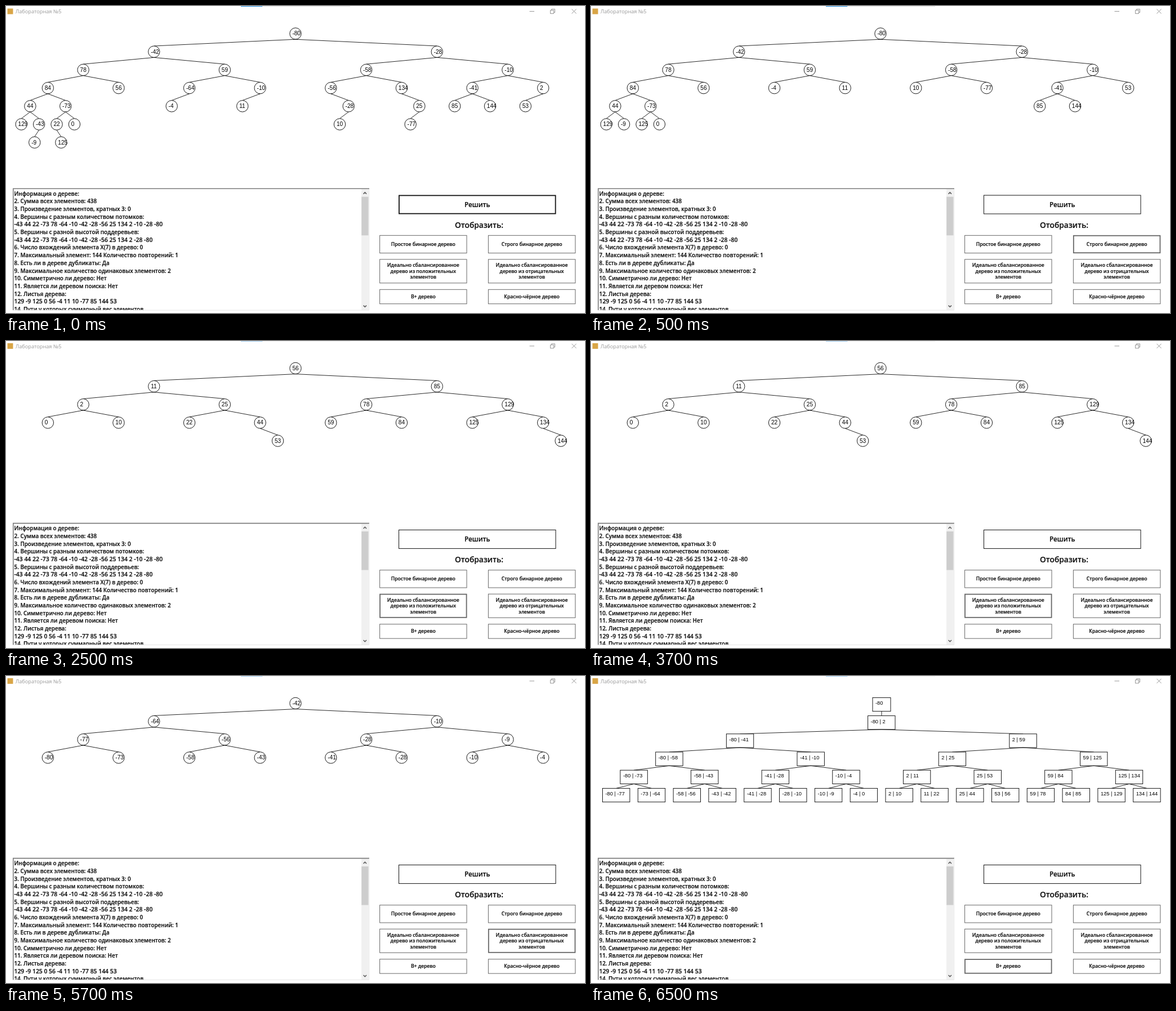
Write an HTML page that moves like this. It is 1028 px wide and 545 px high and loops after 8000 ms.

```html
<!DOCTYPE html>
<html lang="ru">
<head>
<meta charset="utf-8">
<style>
html, body { margin: 0; width: 100%; height: 100%; overflow: hidden; background: #fff; }
svg { display: block; }
text { font: 600 9.88px "Open Sans", "Noto Sans", sans-serif; fill: #111; stroke: #111; stroke-width: .2; white-space: pre; }
.node { font: 10.1px "Liberation Sans", Arial, sans-serif; fill: #000; stroke: none; }
.key { font: 9.3px "Liberation Sans", Arial, sans-serif; fill: #000; stroke: none; }
.title { font-weight: 400; fill: #999; stroke: none; }
.mid { text-anchor: middle; }
.line { fill: none; stroke: #000; stroke-width: .85; }
.shape { fill: #fff; stroke: #000; stroke-width: .9; }
</style>
</head>
<body>
<svg id="stage" width="1028" height="545" viewBox="0 0 1028 545"></svg>
<script>
const stage = document.getElementById('stage');
const LOOP = 8000, CUTS = [500, 2500, 4500, 6500];

const text = (x, y, s, size, name = '') =>
  `<text x="${x}" y="${y}" class="${name}" ${size ? `style="font-size:${size}px"` : ''}>${s}</text>`;
const rect = (x, y, w, h, extra) => `<rect x="${x}" y="${y}" width="${w}" height="${h}" ${extra}/>`;
const path = (d, extra = 'class="line"') => `<path d="${d}" ${extra}/>`;

// Trees are [value, left, right]
const simple = [-80,
  [-42,
    [78, [84, [44, [129], [-43, [-9]]], [-73, [22, null, [125]], [0]]], [56]],
    [59, [-64, [-4]], [-10, [11]]]],
  [-28,
    [-58, [-56, null, [-28, [10]]], [134, null, [25, [-77]]]],
    [-10, [-41, [85], [144]], [2, [53]]]]];

const values = ([v, l, r]) => [v, ...(l ? values(l) : []), ...(r ? values(r) : [])];
const sorted = values(simple).sort((a, b) => a - b);

// Replaces every node that has one child by that child
function strict([v, l, r]) {
  if (l && r) return [v, strict(l), strict(r)];
  return l || r ? strict(l || r) : [v];
}

function balanced(list) {
  if (!list.length) return null;
  const m = (list.length - 1) >> 1;
  return [list[m], balanced(list.slice(0, m)), balanced(list.slice(m + 1))];
}

const nodeX = (depth, i) => 11.5 + 1005 * (2 * i + 1) / 2 ** (depth + 1);
const nodeY = depth => 49 + 32.2 * depth;

function drawTree([v, ...kids], depth = 0, i = 0) {
  const x = nodeX(depth, i), y = nodeY(depth);
  let out = `<circle cx="${x}" cy="${y}" r="10.2" class="shape"/>` +
    text(x - 5.6, y + 3.4, v, 0, 'node');
  kids.forEach((kid, side) => {
    if (!kid) return;
    const j = 2 * i + side;
    out += path(`M${x} ${y + 10.2}L${nodeX(depth + 1, j)} ${nodeY(depth + 1) - 10.2}`) +
      drawTree(kid, depth + 1, j);
  });
  return out;
}

function drawPages() {
  const page = (x, y, w, s) => rect(x, y - 10, w, 24.3, 'class="shape"') +
    text(x + 5, y + 3, s, 0, 'key');
  let out = page(500, nodeY(0), 32, sorted[0]) + path(`M516 ${nodeY(0) + 14.3}V${nodeY(1) - 10}`);
  for (let d = 0; d < 5; d++) {
    const step = 32 >> d, y = nodeY(d + 1);
    for (let i = 0; i < 2 ** d; i++) {
      const x = nodeX(d, i);
      out += page(x - 22.4, y, 48.4, `${sorted[i * step]} | ${sorted[i * step + step / 2]}`);
      for (const j of d < 4 ? [2 * i, 2 * i + 1] : [])
        out += path(`M${x + 1.8} ${y + 14.3}L${nodeX(d + 1, j) + 1.8} ${y + 22.2}`);
    }
  }
  return out;
}

const report = [
  'Информация о дереве:',
  '2. Сумма всех элементов: 438',
  '3. Произведение элементов, кратных 3: 0',
  '4. Вершины с разным количеством потомков:',
  '-43 44 22 -73 78 -64 -10 -42 -28 -56 25 134 2 -10 -28 -80',
  '5. Вершины с разной высотой поддеревьев:',
  '-43 44 22 -73 78 -64 -10 -42 -28 -56 25 134 2 -28 -80',
  '6. Число вхождений элемента X(7) в дерево: 0',
  '7. Максимальный элемент: 144 Количество повторений: 1',
  '8. Есть ли в дереве дубликаты: Да',
  '9. Максимальное количество одинаковых элементов: 2',
  '10. Симметрично ли дерево: Нет',
  '11. Является ли деревом поиска: Нет',
  '12. Листья дерева:',
  '129 -9 125 0 56 -4 11 10 -77 85 144 53',
  '14. Пути у которых суммарный вес элементов'];

function drawReport() {
  const lines = report.map((s, i) =>
    text(14.5, 336.8 + 13.67 * i, s, /[а-я]/.test(s) ? 0 : 10.4)).join('');
  return `<clipPath id="box"><rect x="12" y="323" width="634" height="217"/></clipPath>
    <g clip-path="url(#box)">${lines}</g>` +
    rect(631, 325, 12.6, 215, 'fill="#f0f0f0"') +
    rect(631.2, 338.7, 12.2, 68.5, 'fill="#cdcdcd"') +
    path('M12.8 540V324.2H645', 'fill="none" stroke="#7c7c7c" stroke-width="1.6"') +
    path('M644.5 325V540H13', 'fill="none" stroke="#e6e6e6"') +
    path('M634.6 333.6l2.7-2.7 2.7 2.7M634.6 531.6l2.7 2.7 2.7-2.7',
      'fill="none" stroke="#555" stroke-width="1.5"');
}

// The first five buttons open the scenes in order
const buttons = [
  [697.5, 336, 278.5, 33, ['Решить']],
  [856.4, 407.3, 154.4, 31.3, ['Строго бинарное дерево']],
  [663.6, 449.8, 154.4, 42, ['Идеально сбалансированное', 'дерево из положительных', 'элементов']],
  [856.4, 449.8, 154.4, 42, ['Идеально сбалансированное', 'дерево из отрицательных', 'элементов']],
  [663.6, 503.3, 154.4, 25.4, ['B+ дерево']],
  [663.6, 407.3, 154.4, 31.3, ['Простое бинарное дерево']],
  [856.4, 503.3, 154.4, 25.4, ['Красно-чёрное дерево']]];

function drawButton([x, y, w, h, lines], i, active) {
  const size = i ? 8.6 : 11.7, color = i ? '#666' : '#111';
  const inset = active ? 0.4 : 0;
  return rect(x + inset, y + inset, w - 2 * inset, h - 2 * inset,
    `fill="#fff" stroke="${color}" stroke-width="${active ? 1.8 : 1}"`) +
    lines.map((s, k) => text(x + w / 2, y + h / 2 + size * 0.35 + 10.6 * (k - (lines.length - 1) / 2),
      s, size, 'mid')).join('');
}

const drawWindow = () =>
  rect(417, -1, 38.5, 2, 'fill="#1683d8"') + rect(455.5, -1, 155.5, 2, 'fill="#e2e2e2"') +
  rect(2.5, 4.5, 10, 10, 'fill="#d9a546"') +
  text(16.7, 13.2, 'Лабораторная №5', 9.2, 'title') +
  path('M929.5 9.5h8.5M966.5 7.5h6v6h-6zM968.5 7.5v-2h6v6h-2M1004.5 5.5l8 8M1012.5 5.5l-8 8',
    'fill="none" stroke="#8c8c8c" stroke-width=".9"');

const scenes = [
  drawTree(simple),
  drawTree(strict(simple)),
  drawTree(balanced(sorted.filter(v => v >= 0))),
  drawTree(balanced(sorted.filter(v => v < 0))),
  drawPages()];

function draw(scene) {
  // The window sits slightly higher from the third scene on
  stage.innerHTML = `<g transform="translate(0 ${scene < 2 ? 0 : -0.6})">` +
    drawWindow() + scenes[scene] + drawReport() +
    buttons.map((b, i) => drawButton(b, i, i === scene)).join('') +
    text(840, 393.7, 'Отобразить:', 13.7, 'mid') + '</g>';
}

let shown = -1;
function tick() {
  const t = performance.now() % LOOP;
  const scene = CUTS.filter(c => c <= t).length;
  if (scene !== shown) draw(shown = scene);
  requestAnimationFrame(tick);
}
tick();
</script>
</body>
</html>
```
